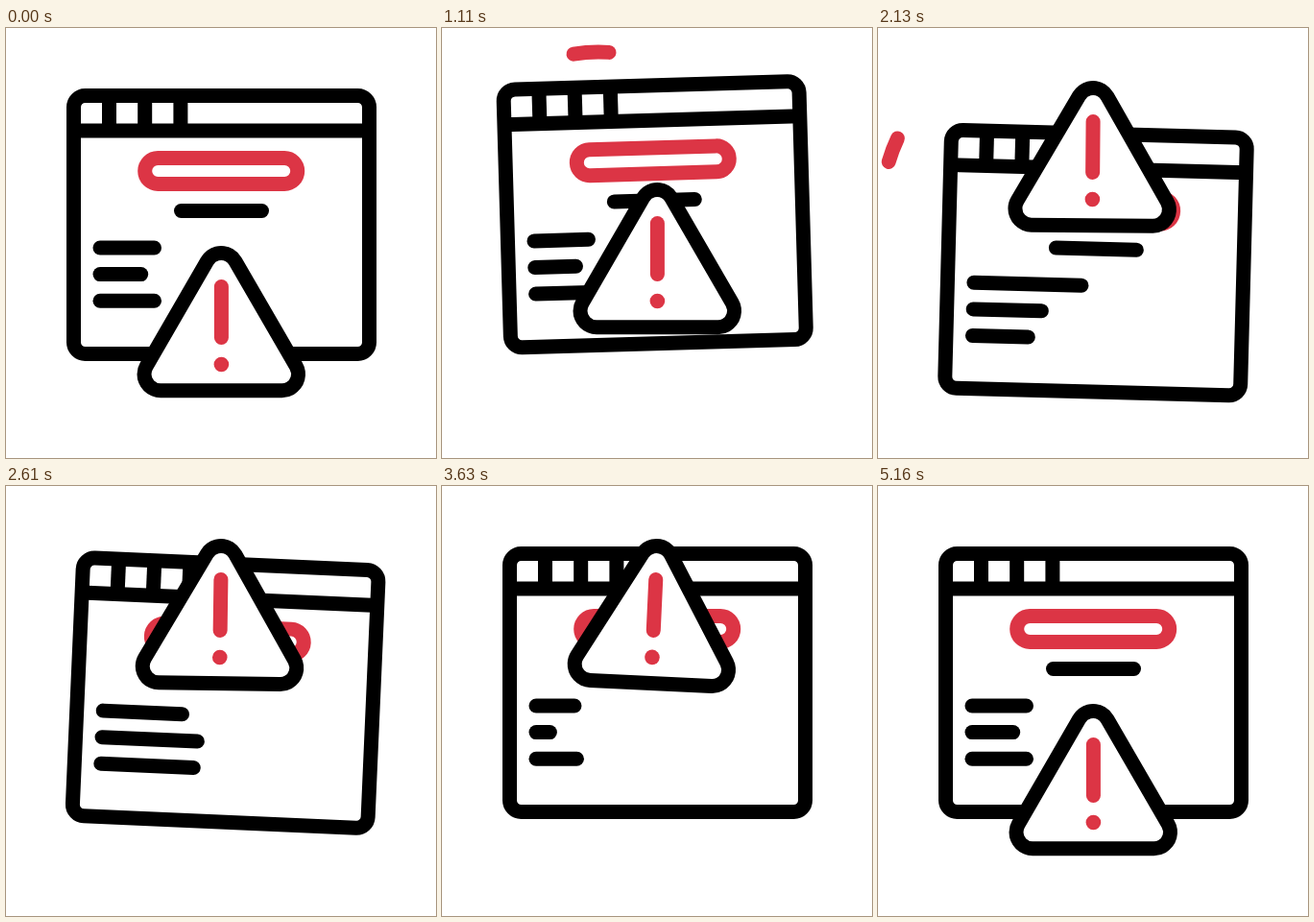
Write an HTML page with a canvas that moves like this. It is 448x448 px and loops after 5.4 s.

```html
<!DOCTYPE html>
<html lang="en">
<head>
<meta charset="utf-8">
<title>Window alert</title>
<style>
html, body { margin: 0; width: 100%; height: 100%; overflow: hidden; background: #fff; }
canvas { display: block; }
</style>
</head>
<body>
<canvas id="stage" width="448" height="448"></canvas>
<script>
const ctx = document.getElementById('stage').getContext('2d');
const LOOP = 5400, STEP = 30, STROKE = 15;
const BLACK = '#000', RED = '#dc3545', WHITE = '#fff';
const RAD = Math.PI / 180;

// Sine ease from 0 to 1 between two times.
function ease(t, from, to) {
  const p = Math.min(1, Math.max(0, (t - from) / (to - from)));
  return (1 - Math.cos(Math.PI * p)) / 2;
}

// The window hops up, drops low and settles back.
function windowLift(t) {
  return -24 * ease(t, 300, 870) + 75 * ease(t, 870, 1740) - 51 * ease(t, 1740, 2985);
}

function windowTilt(t) {
  return -3 * ease(t, 660, 1500) + 5.9 * ease(t, 1500, 2430) - 2.9 * ease(t, 2430, 3180);
}

// The sign dips, climbs, hangs and drops home.
function signLift(t) {
  return 20 * ease(t, 300, 690) - 192 * ease(t, 690, 1590) + 172 * ease(t, 4440, 5160);
}

// While hanging, the sign makes three full swings.
function signTilt(t) {
  const first = 1530, halfSwing = 416, last = first + 6 * halfSwing;
  const swing = Math.cos(Math.PI * (Math.min(Math.max(t, first), last) - first) / halfSwing);
  return -2.7 * swing * ease(t, 1110, first) * (1 - ease(t, last, 4800));
}

function lineGrowth(t) {
  return 57 * ease(t, 1320, 2220) - 86 * ease(t, 2220, 3170) + 29 * ease(t, 3170, 4180);
}

function line(x1, y1, x2, y2, color = BLACK, cap = 'round') {
  ctx.strokeStyle = color;
  ctx.lineCap = cap;
  ctx.beginPath();
  ctx.moveTo(x1, y1);
  ctx.lineTo(x2, y2);
  ctx.stroke();
}

function box(x, y, w, h, r, color) {
  ctx.strokeStyle = color;
  ctx.beginPath();
  ctx.roundRect(x, y, w, h, r);
  ctx.stroke();
}

function posed(x, y, dy, degrees, draw) {
  ctx.save();
  ctx.translate(x, y + dy);
  ctx.rotate(degrees * RAD);
  ctx.translate(-x, -y);
  draw();
  ctx.restore();
}

function drawArc(t) {
  const start = -86, sweep = 78;
  const head = sweep * ease(t, 855, 1790), tail = sweep * ease(t, 1620, 2280);
  if (head - tail < 0.1) return;
  ctx.strokeStyle = RED;
  ctx.lineCap = 'round';
  ctx.beginPath();
  ctx.arc(163, 183, 158, (start - head) * RAD, (start - tail) * RAD);
  ctx.stroke();
}

function drawWindow(t) {
  box(70.5, 70.5, 308, 269, 12, BLACK);
  line(70.5, 107, 378.5, 107, BLACK, 'butt');
  for (let i = 0; i < 3; i++) {
    const x = 107.5 + 37.2 * i;
    line(x, 70.5, x, 107, BLACK, 'butt');
  }
  box(144.7, 135.5, 159, 27, 13.5, RED);
  line(182.5, 190.5, 266.5, 190.5);
  for (let i = 0; i < 3; i++) {
    const y = 229 + 27.6 * i;
    const end = i === 1 ? 140.7 : 154.5;
    line(98, y, end + lineGrowth(t - 360 * i), y);
  }
}

function drawSign() {
  ctx.beginPath();
  ctx.moveTo(224.2, 251.5);
  ctx.lineTo(287.5, 360.7);
  ctx.lineTo(161, 360.7);
  ctx.closePath();
  ctx.lineJoin = 'round';
  for (const [color, width] of [[BLACK, 49], [WHITE, 19]]) {
    ctx.strokeStyle = color;
    ctx.lineWidth = width;
    ctx.stroke();
  }
  ctx.fillStyle = WHITE;
  ctx.fill();

  ctx.lineWidth = STROKE;
  line(224.4, 269.5, 224.4, 322.5, RED);
  ctx.fillStyle = RED;
  ctx.beginPath();
  ctx.arc(224.4, 350.5, 7.8, 0, Math.PI * 2);
  ctx.fill();
}

function render(t) {
  ctx.fillStyle = WHITE;
  ctx.fillRect(0, 0, 448, 448);
  ctx.lineWidth = STROKE;
  drawArc(t);
  posed(224.5, 300, windowLift(t), windowTilt(t), () => drawWindow(t));
  posed(224.2, 234, signLift(t), signTilt(t), drawSign);
}

const start = performance.now();
function tick() {
  const t = (performance.now() - start) % LOOP;
  render(Math.floor(t / STEP) * STEP);
  requestAnimationFrame(tick);
}
tick();
</script>
</body>
</html>
```
